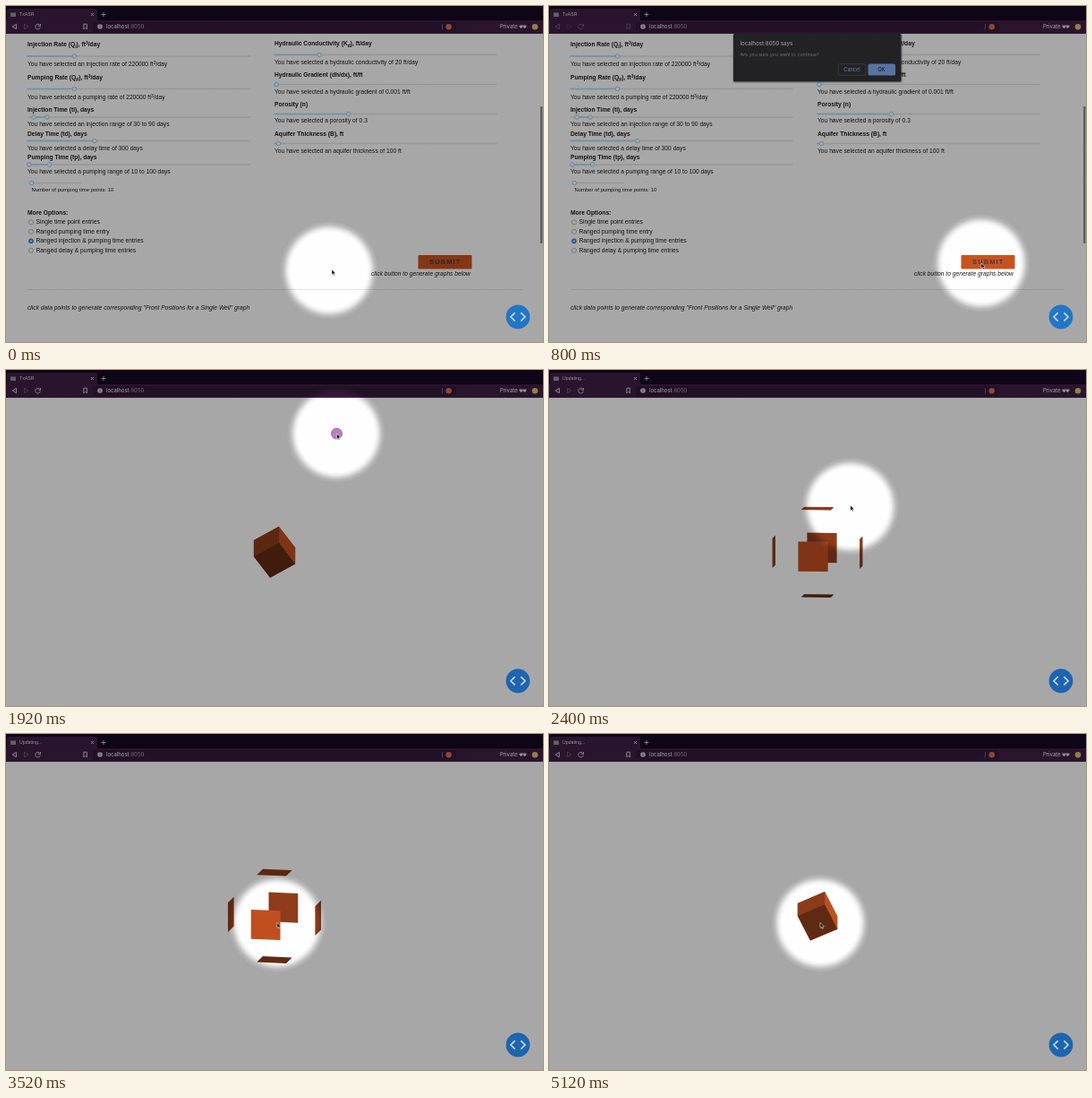
Animation, 600 px wide and 375 px high, one loop 5280 ms. Source, as an HTML page:

```html
<!DOCTYPE html>
<html lang="en">
<head>
<meta charset="utf-8">
<title>TxASR</title>
<style>
html, body { margin: 0; width: 100%; height: 100%; overflow: hidden; background: #a8a7a9; }
svg { display: block; width: 100vw; height: 100vh; }
text { font: 6.7px "Liberation Sans", Arial, sans-serif; fill: #1c1b1d; white-space: pre; }
.b { font-weight: bold; }
.i { font-style: italic; }
.small { font-size: 5.9px; }
.ui { font: 500 5.9px Inter, sans-serif; fill: #e6dfea; }
.tab { font: 5.2px "Liberation Sans", Arial, sans-serif; fill: #e6dfea; }
.submit { font-size: 7.4px; letter-spacing: 1.2px; fill: #3f3b48; }
.line { fill: none; stroke: #ddd4e0; stroke-width: .9; }
</style>
</head>
<body>
<svg viewBox="0 0 600 375" preserveAspectRatio="none">
  <defs>
    <radialGradient id="spot" gradientUnits="userSpaceOnUse" cx="0" cy="0" r="55">
      <stop offset=".78" stop-color="#000" stop-opacity="0"/>
      <stop offset=".84" stop-color="#000" stop-opacity=".07"/>
      <stop offset=".93" stop-color="#000" stop-opacity=".27"/>
      <stop offset="1" stop-color="#000" stop-opacity=".342"/>
    </radialGradient>
  </defs>
  <rect width="600" height="375" fill="#fffeff"/>
  <g id="page"></g>
  <g id="cube"></g>
  <g id="bar">
    <rect width="600" height="31" fill="#150722"/>
    <path d="M1 16V5q0-2 2-2h97q2 0 2 2v11h498v15H0V16z" fill="#401f45"/>
    <rect x="97" y="18" width="406" height="11" rx="2" fill="#331839"/>
    <rect x="5" y="7.5" width="6" height="4.5" fill="#8c9499"/>
    <text id="title" class="tab" x="15" y="11.4"></text>
    <path class="line" d="M95 8l3 3m0-3l-3 3M106.500 9.500h5m-2.500-2.500v5"/>
    <g id="nav" class="line">
      <path d="M11.500 20.300v5.400L7 23z"/>
      <path d="M20.500 20.300v5.400L25 23z" opacity=".3"/>
      <path d="M38 21.700a2.800 2.800 0 1 0 .3 2M38.500 20v2.300h-2.300"/>
      <path d="M86.800 20.200h3.600v5.600l-1.800-1.500-1.800 1.500z"/>
    </g>
    <circle cx="105" cy="23" r="2.800" fill="#ddd4e0"/>
    <path d="M105 22.600v2m0-3.600v.8" stroke="#331839" stroke-width=".8"/>
    <text class="ui" x="112" y="25.100">localhost<tspan fill="#9d8ba3">:8050</tspan></text>
    <path d="M487.500 20v6.500" stroke="#6470b8" stroke-width=".8"/>
    <circle cx="494.700" cy="23.200" r="3.200" fill="#e06a4c"/>
    <text class="ui" x="552" y="25.100" font-size="5.600">Private</text>
    <path d="M573.500 22h8M574 22.200h3v1.200q-1.500 2-3 0zm4 0h3v1.200q-1.500 2-3 0z" fill="#e6dfea" stroke="#e6dfea" stroke-width=".7"/>
    <circle cx="591" cy="23.300" r="3.300" fill="#e3c067"/>
  </g>
  <g id="dialog">
    <rect x="205" y="31" width="190" height="55" rx="2" fill="#000" opacity=".18"/>
    <rect x="206" y="31" width="187.500" height="53.500" rx="1.500" fill="#343338"/>
    <text class="ui" x="213.500" y="43.700" style="font-size:6.1px">localhost:8050 says</text>
    <text class="ui" x="213.500" y="55.500" style="font-size:5.3px;font-weight:400;fill:#a9a7ad">Are you sure you want to continue?</text>
    <rect x="323.300" y="64.800" width="30.500" height="12.400" rx="1.500" fill="none" stroke="#5c5d66" stroke-width=".8"/>
    <text class="ui" x="338.500" y="73" text-anchor="middle" style="font-size:5.5px;fill:#8ab4f8">Cancel</text>
    <rect x="356.500" y="64.500" width="30.500" height="13" rx="1.500" fill="#86aff2"/>
    <text class="ui" x="371.500" y="73" text-anchor="middle" style="font-size:5.5px;fill:#28313f">OK</text>
  </g>
  <rect width="600" height="375" fill="url(#spot)"/>
  <circle id="debug" cx="572" cy="347" r="13.400"/>
  <path d="M568.700 342.300L564 347l4.700 4.700M575.300 342.300L580 347l-4.700 4.700" fill="none" stroke="#c6d4e2" stroke-width="1.700"/>
  <circle id="ring" r="6" fill="#a85cb4" fill-opacity=".78" stroke="#7f4a88" stroke-width=".7"/>
  <path id="cursor" d="M0 0v6l1.400-1.200 1 2.200 1-.5-1-2.100h1.900z" fill="#000" stroke="#fff" stroke-width=".55"/>
</svg>
<script>
const LOOP = 5280, STEP = 160;
const $ = id => document.getElementById(id);

// ---- page: text and controls, y is the middle of a line ----
const script = s => s.replace(/([\^_])(\w)(.)/g, (m, kind, ch, next) => {
  const dy = kind === '^' ? -2 : 1.4;
  return `<tspan dy="${dy}" style="font-size:5px">${ch}</tspan><tspan dy="${-dy}">${next}</tspan>`;
});
const text = (x, y, s, cls = '') => `<text class="${cls}" x="${x}" y="${y + 2.3}">${script(s)}</text>`;

function slider(x, y, w, from, ...handles) {
  const to = handles[handles.length - 1];
  const bar = (a, b, c) => `<path d="M${a} ${y}H${b}" stroke="${c}" stroke-width="1.5" stroke-linecap="round"/>`;
  return bar(x, x + w, '#e4e3e5') + bar(from, to, '#a4dcf6') + handles.map(h =>
    `<circle cx="${h}" cy="${y}" r="2.3" fill="#fff" stroke="#86cdf0" stroke-width=".9"/>`).join('');
}

const field = (x, yLabel, label, bar, yNote, note) =>
  text(x, yLabel, label, 'b') + bar + text(x, yNote, 'You have selected ' + note);

function radio(y, label, on) {
  return `<circle cx="28" cy="${y + .5}" r="2.6" fill="${on ? '#2f86f0' : '#fff'}" stroke="${on ? '#2f86f0' : '#8d8c8f'}" stroke-width=".6"/>` +
    (on ? `<circle cx="28" cy="${y + .5}" r="1" fill="#fff"/>` : '') + text(33.5, y, label);
}

$('page').innerHTML = [
  field(24, 43, 'Injection Rate (Q_i), ft^3/day', slider(24, 56, 248, 24, 76.5), 65, 'an injection rate of 220000 ft^3/day'),
  field(24, 79.5, 'Pumping Rate (Q_p), ft^3/day', slider(24, 92.5, 248, 24, 76.5), 101.5, 'a pumping rate of 220000 ft^3/day'),
  field(24, 116, 'Injection Time (ti), days', slider(24, 124, 248, 31, 31, 46), 131.5, 'an injection range of 30 to 90 days'),
  field(24, 142.5, 'Delay Time (td), days', slider(24, 150.5, 248, 24, 99), 158.5, 'a delay time of 300 days'),
  field(24, 169, 'Pumping Time (tp), days', slider(24, 177, 248, 26, 26, 48.5), 185, 'a pumping range of 10 to 100 days'),
  slider(28, 197.5, 55, 28, 28.5),
  text(28.5, 204.8, 'Number of pumping time points: 10', 'small'),
  field(300, 42, 'Hydraulic Conductivity (K_d), ft/day', slider(300, 54.5, 248, 300, 350), 62.5, 'a hydraulic conductivity of 20 ft/day'),
  field(300, 76.5, 'Hydraulic Gradient (dh/dx), ft/ft', slider(300, 87.5, 248, 300, 302), 95.5, 'a hydraulic gradient of 0.001 ft/ft'),
  field(300, 109.5, 'Porosity (n)', slider(300, 120.5, 248, 300, 382.5), 128, 'a porosity of 0.3'),
  field(300, 142.5, 'Aquifer Thickness (B), ft', slider(300, 153.5, 248, 300, 304.5), 161.5, 'an aquifer thickness of 100 ft'),
  text(24, 230.5, 'More Options:', 'b'),
  radio(240.8, 'Single time point entries'),
  radio(251.3, 'Ranged pumping time entry'),
  radio(261.8, 'Ranged injection &amp; pumping time entries', true),
  radio(272.3, 'Ranged delay &amp; pumping time entries'),
  '<rect x="460.5" y="278" width="60" height="15.5" rx="1" fill="#c9531f"/>',
  text(473, 286, 'SUBMIT', 'b submit'),
  text(408, 298.3, 'click button to generate graphs below', 'i'),
  '<path d="M24 316.500H576" stroke="#dddcde" stroke-width=".8"/>',
  text(24, 336.5, 'click data points to generate corresponding "Front Positions for a Single Well" graph', 'i'),
  '<rect x="597" y="112" width="2.500" height="153" rx="1.200" fill="#918f93"/>'
].join('');

// ---- motion ----
const lerp = (a, b, k) => a + (b - a) * k;
const smooth = k => k * k * (3 - 2 * k);
const clamp = k => Math.min(1, Math.max(0, k));

function sample(table, t, ease = k => k) {
  let n = 1;
  while (n < table.length - 1 && table[n][0] < t) n++;
  const a = table[n - 1], b = table[n];
  const k = ease(clamp((t - a[0]) / (b[0] - a[0])));
  return a.slice(1).map((v, j) => lerp(v, b[j + 1], k));
}

// time, cursor x y, spotlight x y
const MOVES = [
  [0, 364, 294, 361, 295],
  [320, 474, 291, 468, 290],
  [480, 483, 287, 482, 287],
  [800, 483, 287, 483, 287],
  [1280, 372.5, 60.5, 374, 64],
  [1440, 369.5, 71, 369, 71],
  [2080, 369.5, 71, 369, 71],
  [2720, 304, 231, 304, 234],
  [2880, 303, 210.5, 303, 211],
  [LOOP, 303, 210.5, 303, 211]
];

// time, swing phase in degrees
const SWING = [[1400, -180], [1920, -120.7], [2720, -28.2], [3520, 59.8], [5120, 231], [5280, 248]];

const HALF = 16.7, SPREAD = 49.7;
const FACES = [
  [0, -1, '#8c3b1a'], [0, 1, '#8c3b1a'],
  [1, -1, '#8c3b1a'], [1, 1, '#602a12'],
  [2, -1, '#8e3c1b'], [2, 1, '#c04f20']
];

function drawCube(t) {
  const phase = sample(SWING, t)[0];
  const turn = (22.5 - 67.5 * Math.cos(phase * Math.PI / 180)) * Math.PI / 180;
  const away = Math.abs(phase > 180 ? phase - 360 : phase);
  const dist = lerp(SPREAD, HALF, smooth(clamp((away - 60) / 60)));
  const s = Math.sin(turn), c = Math.cos(turn);
  const axes = [[c, s * s, -s * c], [0, c, s], [s, -c * s, c * c]];
  $('cube').innerHTML = FACES.map(([n, sign, fill]) => {
    const u = axes[(n + 1) % 3], v = axes[(n + 2) % 3];
    const mid = axes[n].map(q => q * sign * dist);
    const points = [[-1, -1], [1, -1], [1, 1], [-1, 1]].map(([p, q]) =>
      [300, 203.3].map((o, j) => (o + mid[j] + HALF * (p * u[j] + q * v[j])).toFixed(2)));
    return { z: mid[2], svg: `<polygon points="${points.join(' ')}" fill="${fill}"/>` };
  }).sort((a, b) => a.z - b.z).map(f => f.svg).join('');
}

const show = (id, on) => $(id).style.display = on ? '' : 'none';
const place = (id, x, y, attr = 'transform') => $(id).setAttribute(attr, `translate(${x} ${y})`);
const within = (t, a, b) => t >= a && t < b;

function draw(t) {
  const loading = t >= 1600, asking = within(t, 800, 1600);
  const [x, y, sx, sy] = sample(MOVES, t, t > 480 ? smooth : undefined);
  show('page', !loading);
  show('cube', loading);
  show('dialog', asking);
  show('ring', within(t, 480, 800) || within(t, 1600, 2080));
  if (loading) drawCube(t);
  $('title').textContent = t >= 2080 ? 'Updating...' : 'TxASR';
  $('nav').setAttribute('opacity', asking ? .35 : 1);
  $('debug').setAttribute('fill', loading ? '#1d65b0' : '#2176c6');
  place('cursor', x, y);
  place('ring', x, y);
  place('spot', sx, sy, 'gradientTransform');
}

const start = performance.now();
let last = -1;
function tick() {
  const t = Math.floor((performance.now() - start) % LOOP / STEP) * STEP;
  if (t !== last) draw(last = t);
  requestAnimationFrame(tick);
}
tick();
</script>
</body>
</html>
```
